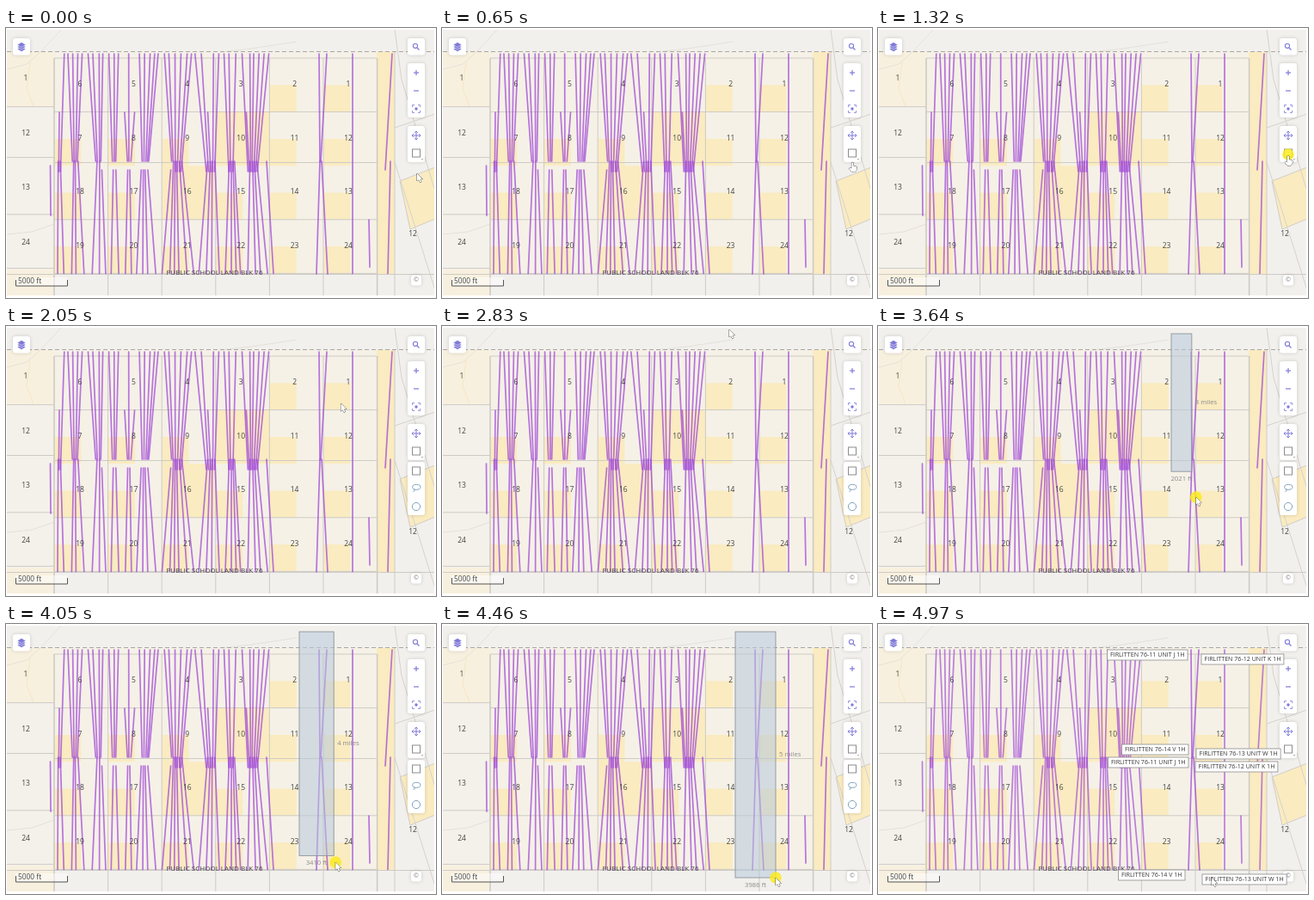
Animation, 500 px wide and 314 px high, one loop 5.44 s. Source, as an HTML page with a canvas:

```html
<!DOCTYPE html>
<html lang="en">
<head>
<meta charset="utf-8">
<title>Map selection</title>
<style>
html, body { margin: 0; width: 100%; height: 100%; overflow: hidden; background: #fff; }
canvas { display: block; width: 500px; height: 314px; }
</style>
</head>
<body>
<canvas id="stage"></canvas>
<script>
const W = 500, H = 314, LOOP = 5440, STEP = 67.75;
const FONT = '"Open Sans", "Noto Sans", sans-serif';
const ICON = '#7f7ad8', TOOL = '#8c8c8c', YELLOW = '#faebc0';
const WEST = 56, NORTH = 35, SECTION = 62.6;
const RECT = { x: 341, y: 9 };
const canvas = document.getElementById('stage');
const ctx = canvas.getContext('2d');
const ratio = window.devicePixelRatio || 1;
canvas.width = W * ratio;
canvas.height = H * ratio;

let seed = 11;
function random() {
  seed = (seed * 16807) % 2147483647;
  return seed / 2147483647;
}

// Wells lean towards the drilling pads along the middle of the map.
const pads = [61, 80, 109, 126, 143, 160, 197, 240, 262, 285];
function leanToPad(x) {
  const pad = pads.reduce((a, b) => Math.abs(b - x) < Math.abs(a - x) ? b : a);
  return x + (pad - x) * 0.65;
}

const wells = [];
for (let x = 62; x < 306; x += 4 + random() * 4) {
  wells.push([x, random() < 0.08 ? 98 : 30, leanToPad(x), x > 190 || x < 70 ? 167 : 155]);
}
for (let x = 60; x < 306; x += 4.5 + random() * 5) {
  wells.push([leanToPad(x), x > 115 && x < 185 ? 165 : 155, x, 285.5]);
}
wells.push([303, 155, 311, 285.5], [403, 30, 403, 285.5], [51.5, 160, 52, 218],
  [422, 223, 423, 278], [449, 30, 441, 165], [447, 155, 444, 285.5]);

const selected = [
  { name: '76-11 UNIT J', path: [364, 30, 365, 155] },
  { name: '76-12 UNIT K', path: [373, 30, 366, 155], east: true },
  { name: '76-14 V', path: [365, 155, 361, 286], south: true },
  { name: '76-13 UNIT W', path: [367, 155, 374, 286], east: true, south: true }
];

// Tracks: [time, x, y].
const cursorTrack = [
  [252, 478, 169], [790, 477, 149], [1670, 477, 149], [2200, 342, 58],
  [2750, 320, 6], [2826, 334, 4], [2962, RECT.x, RECT.y]
];
const dragTrack = [
  [2962, RECT.x, RECT.y], [3639, 364.8, 169], [4040, 381.1, 269], [4450, 388, 295]
];

function sample(track, time) {
  const next = track.findIndex(key => key[0] > time);
  if (next === 0) return track[0].slice(1);
  if (next < 0) return track[track.length - 1].slice(1);
  const a = track[next - 1], b = track[next];
  const p = (time - a[0]) / (b[0] - a[0]);
  return a.slice(1).map((v, i) => v + (b[i + 1] - v) * p);
}

function box(x, y, w, h, fill) {
  ctx.fillStyle = fill;
  ctx.fillRect(x, y, w, h);
}

function frame(x, y, w, h, color, width = 1) {
  ctx.strokeStyle = color;
  ctx.lineWidth = width;
  ctx.strokeRect(x, y, w, h);
}

function trace(points, close = false) {
  ctx.beginPath();
  for (let i = 0; i < points.length; i += 2) ctx.lineTo(points[i], points[i + 1]);
  if (close) ctx.closePath();
}

function paint(color, width) {
  if (width) {
    ctx.strokeStyle = color;
    ctx.lineWidth = width;
    ctx.stroke();
  } else {
    ctx.fillStyle = color;
    ctx.fill();
  }
}

function line(points, color, width = 1) {
  trace(points);
  paint(color, width);
}

function oval(x, y, rx, ry = rx) {
  ctx.beginPath();
  ctx.ellipse(x, y, rx, ry, 0, 0, Math.PI * 2);
}

function text(str, x, y, size, color = '#444', align = 'center') {
  ctx.font = `${size}px ${FONT}`;
  ctx.textAlign = align;
  ctx.textBaseline = 'middle';
  ctx.fillStyle = color;
  ctx.fillText(str, x, y);
}

function drawLand() {
  box(0, 0, W, H, '#fff');
  ctx.save();
  ctx.beginPath();
  ctx.rect(1, 2, 497, 309);
  ctx.clip();
  box(0, 0, W, H, '#f2f0ed');
  box(1, 28, 55, 283, '#f8f0de');
  box(1, 91, 55, 190, '#f4f1ea');
  box(WEST, 28, 395, 258, '#f5f1e7');

  // Leases cover the south-west quarter of a section, or all of it.
  for (let row = 0; row < 4; row++) {
    for (let col = row ? 0 : 4; col < 6; col++) {
      const x = WEST + col * SECTION, y = NORTH + row * SECTION;
      const whole = row + col === 4 && (row === 1 || row === 2);
      if (whole) box(x, y, SECTION, SECTION, YELLOW);
      else box(x, y + SECTION / 2, SECTION / 2, SECTION / 2, YELLOW);
    }
  }
  box(431, 28, 21, 258, YELLOW);
  trace([458, 178, 499, 162, 499, 222, 470, 234], true);
  paint(YELLOW);
  paint('#d0cdc8', 1);

  const road = '#e5e1da', highway = '#d5d2cd';
  line([1, 48, 24, 42, 40, 28, 64, 2], road);
  line([28, 39, 24, 70, 32, 91], '#f5e7c4');
  line([250, 28, 285, 24, 338, 16], road);
  line([1, 240, 30, 237, 56, 228], road);
  line([452, 2, 460, 60, 499, 190], highway);
  line([452, 116, 499, 100], highway);
  line([452, 156, 499, 305], highway);

  const edge = '#cecbc5';
  for (let col = 0; col <= 6; col++) {
    const x = WEST + col * SECTION;
    line([x, NORTH, x, 311], edge, col % 6 ? 1 : 1.6);
  }
  for (let row = 0; row <= 4; row++) {
    const y = row === 2 ? 156.5 : NORTH + row * SECTION;
    line([WEST, y, 431, y], edge);
    if (row) line([1, y - 6, WEST, y - 6], edge);
  }
  line([452, 28, 452, 311], edge);
  line([1, 286.5, 498, 286.5], edge);
  ctx.setLineDash([5, 3]);
  line([1, 27.5, 498, 27.5], '#aaa7a1');
  ctx.setLineDash([]);
  ctx.restore();
}

function drawLandLabels() {
  for (let row = 0; row < 4; row++) {
    for (let col = 0; col < 6; col++) {
      const n = row * 6 + (row % 2 ? col + 1 : 6 - col);
      text(n, 86 + col * 62.4, 66 + row * SECTION, 8.5);
    }
    text([1, 12, 13, 24][row], 23, 59 + row * 63.5, 8.5);
  }
  text(12, 473, 240, 8.5);
  text('PUBLIC SCHOOL LAND BLK 76', 242.5, 285, 8);
}

function drawWells(dimmed) {
  ctx.lineCap = 'round';
  wells.forEach(path => line(path, `rgba(160, 72, 214, ${dimmed ? 0.68 : 0.74})`, 1.7));
  selected.forEach(well => line(well.path, 'rgba(160, 72, 214, .74)', 1.7));
  ctx.lineCap = 'butt';
}

function panel(y, h, x = 467, w = 20) {
  ctx.save();
  ctx.shadowColor = 'rgba(0, 0, 0, .16)';
  ctx.shadowBlur = 4 * ratio;
  ctx.beginPath();
  ctx.roundRect(x, y, w, h, 3);
  paint('#fff');
  ctx.restore();
}

function drawControls(menuOpen) {
  panel(12, 19.5, 8);
  for (let y = 24.5; y > 19; y -= 2.5) {
    trace([18, y - 3, 23, y, 18, y + 3, 13, y], true);
    paint(ICON);
    paint('#fff', 0.5);
  }

  panel(12, 19.5);
  oval(476, 20.8, 2.6);
  paint(ICON, 1.1);
  line([478, 23, 480.5, 25.5], ICON, 1.2);

  panel(41, 63);
  line([474, 52, 480, 52], ICON, 1.2);
  line([477, 49, 477, 55], ICON, 1.2);
  line([474, 73, 480, 73], ICON, 1.2);
  oval(477, 94, 1.7);
  paint(ICON);

  panel(114, 42);
  for (let turn = 0; turn < 4; turn++) {
    ctx.save();
    ctx.translate(477, 94);
    ctx.rotate(turn * Math.PI / 2);
    line([2, -4.5, 4.5, -4.5, 4.5, -2], ICON, 0.8);
    ctx.restore();
    ctx.save();
    ctx.translate(477, 125);
    ctx.rotate(turn * Math.PI / 2);
    line([0, 0, 0, -5], ICON);
    line([-1.8, -3.2, 0, -5, 1.8, -3.2], ICON);
    ctx.restore();
  }
  frame(472.5, 141, 9, 9, TOOL);
  line([483, 152, 484.2, 153.2, 485.4, 152], TOOL, 0.8);

  if (menuOpen) {
    const blue = '#7fa3bd';
    panel(158, 62);
    frame(472.5, 164, 9, 9, TOOL);
    oval(477.3, 187.3, 4.6, 3);
    paint(blue, 1);
    line([474, 189.5, 475.5, 191, 473.5, 193], blue);
    oval(477, 210, 4.6);
    paint(blue, 1);
  }

  panel(287.5, 12, 471, 12);
  text('©', 477, 293.5, 7, '#777');
  box(11, 290, 60, 10, 'rgba(255, 255, 255, .5)');
  line([11.5, 293, 11.5, 300, 71.5, 300, 71.5, 293], '#555');
  text('5000 ft', 14, 294.5, 8.4, '#444', 'left');
}

function drawSelection(time) {
  const [right, bottom] = sample(dragTrack, time);
  const w = right - RECT.x, h = bottom - RECT.y;
  if (w < 1) return;
  box(RECT.x, RECT.y, w, h, 'rgba(184, 202, 220, .54)');
  frame(RECT.x, RECT.y, w, h, '#8d949b', 0.9);
  const feet = px => Math.round(px * 84.81);
  const tall = feet(h) < 5280 ? `${feet(h)} ft` : `${Math.round(feet(h) / 5280)} miles`;
  text(`${feet(w)} ft`, RECT.x + w / 2, bottom + 9, 7.7, '#8b8b8b');
  text(tall, right + 4, RECT.y + h / 2, 7.7, '#8b8b8b', 'left');
}

function drawTip(label, x, y, east) {
  ctx.font = `7.1px ${FONT}`;
  const w = ctx.measureText(label).width + 7;
  const left = east ? x + 3 : x - 4 - w;
  box(left, y, w, 12, '#fff');
  frame(left, y, w, 12, '#8c8c8c', 0.8);
  text(label, left + 3.5, y + 6.2, 7.1, '#333', 'left');
}

function drawTips() {
  for (const { name, path: [x1, y1, x2, y2], east, south } of selected) {
    const label = `FIRLITTEN ${name} 1H`, drop = east ? 5 : 0;
    drawTip(label, x1, y1 + drop - (south ? 15 : 0), east);
    drawTip(label, x2, y2 + drop, east);
  }
}

function drawCursor(x, y, pressed) {
  const overButton = x > 468 && y < 158;
  if (pressed) {
    oval(x, overButton ? y - 2 : y, 6.8);
    paint('rgba(250, 235, 30, .85)');
  }
  const hand = [-1, 0, 1, 0, 1, 4, 5, 5, 5, 8, 3, 11, -1, 11, -4, 7, -3, 6, -1, 7];
  const arrow = [0, 0, 0, 9, 2, 7.2, 3.5, 10.5, 5, 9.8, 3.5, 6.7, 6.3, 6.5];
  ctx.save();
  ctx.translate(x, y);
  trace(overButton ? hand : arrow, true);
  paint('#444', 0.9);
  paint('#fff');
  ctx.restore();
}

function draw(now) {
  const t = now % LOOP;
  const stepped = 320 + Math.floor((t - 315) / STEP) * STEP;
  const between = (from, to) => t >= from && t < to;
  // While dragging, the pointer runs ahead of the rectangle.
  const [x, y] = stepped < 2962 ? sample(cursorTrack, stepped) : sample(dragTrack, stepped + 120);

  ctx.setTransform(ratio, 0, 0, ratio, 0, 0);
  drawLand();
  drawWells(t >= 4970);
  drawLandLabels();
  if (between(2960, 4580)) drawSelection(stepped);
  drawControls(between(1450, 4580));
  if (t >= 4970) drawTips();
  drawCursor(x, y, between(1320, 1450) || between(2960, 4650));
  requestAnimationFrame(draw);
}
requestAnimationFrame(draw);
</script>
</body>
</html>
```
